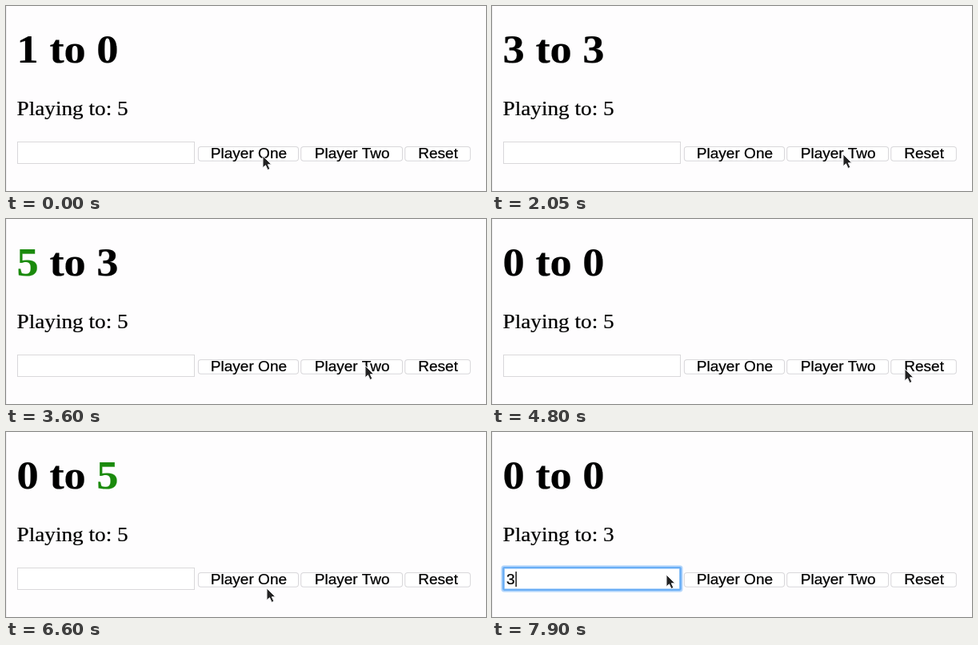
These frames come from a looping animation (600 px wide and 232 px high, 8000 ms). An HTML page:

```html
<!DOCTYPE html>
<html lang="en">
<head>
<meta charset="utf-8">
<title>Score keeper</title>
<style>
  html, body { margin: 0; width: 100%; height: 100%; overflow: hidden; background: #fefdfe; }
  svg { display: block; filter: blur(.4px); }
  text { white-space: pre; stroke: currentColor; stroke-width: .15; }
  .serif { font-family: "Liberation Serif", Times, serif; }
  .sans { font: 11.2px "Liberation Sans", Arial, sans-serif; }
  .box { fill: #fff; stroke: #d8d7da; stroke-width: .6; }
  .button text { text-anchor: middle; }
  .button.down rect { fill: #4a97f8; stroke: #3b87ee; }
  .button.down text { fill: #fff; stroke: #fff; }
  .win { fill: #1a8a0c; stroke: #1a8a0c; }
</style>
</head>
<body>
<svg width="600" height="232" viewBox="0 0 600 232">
  <rect width="1" height="232" fill="#f0eff2"/>
  <!-- the page is a zoomed screen recording, slightly flattened -->
  <g transform="scale(1.7 1.58)">
    <text class="serif" x="8" y="44.9" font-size="32" font-weight="bold"><tspan id="p1"></tspan> to <tspan id="p2"></tspan></text>
    <text class="serif" x="8" y="87" font-size="16">Playing to: <tspan id="goal"></tspan></text>
    <rect class="box" x="8.5" y="107.9" width="130" height="17.1"/>
    <g id="focus">
      <rect x="8" y="107.2" width="131" height="18.5" rx="1" fill="none" stroke="#b4d6fb" stroke-width="2.6"/>
      <rect x="8.4" y="107.7" width="130.2" height="17.5" rx=".6" fill="none" stroke="#6aaef5" stroke-width="1.4"/>
      <text id="typed" class="sans" x="10.6" y="120.6"></text>
      <rect id="caret" y="110.8" width=".8" height="12"/>
    </g>
    <g id="buttons"></g>
  </g>
  <path id="cursor" d="M0 0V14.8L3.5 11.8L6.1 17.5L8.9 16.3L6.3 10.8H10.8Z" fill="#222" stroke="#f0f0f2"/>
</svg>
<script>
const $ = id => document.getElementById(id);
const LOOP = 8000, STEP = 50, GOAL = 5;
const ONE = 0, TWO = 1, RESET = 2;

let left = 141.4;
for (const [label, w] of [["Player One", 73.6], ["Player Two", 74.6], ["Reset", 48]]) {
  $("buttons").innerHTML += `<g class="button">
    <rect class="box" x="${left}" y="111.7" width="${w}" height="11.2" rx="2"/>
    <text class="sans" x="${left + w / 2 + .3}" y="120.6">${label}</text></g>`;
  left += w + 1.9;
}

// Pointer visits: leave, arrive, x, y, button, click times
const visits = [
  [0, 0, 321, 188, ONE, 550, 850],
  [1050, 1400, 439, 186, TWO, 1500, 1650, 2050],
  [2150, 2350, 325, 185, ONE, 2350, 2600],
  [2600, 2850, 32, 1],
  [3150, 3350, 327, 188, ONE, 3400],
  [3400, 3600, 449, 184, TWO, 3600, 3850],
  [4200, 4700, 516, 188, RESET, 4750],
  [5150, 5300, 437, 188, TWO, 5300, 5450, 5550, 5650, 5800],
  [6150, 6500, 326, 196, ONE, 6550],
  [6600, 7000, 535, 181, RESET, 7000],
  [7350, 7750, 218, 179]
];
const focusAt = visits.at(-1)[1], typeAt = focusAt + 150;

function pointer(t) {
  const i = visits.findLastIndex(v => v[0] <= t);
  const [leave, arrive, x1, y1] = visits[i];
  const [, , x0, y0] = visits[Math.max(i - 1, 0)];
  const u = Math.min((t - leave) / (arrive - leave || 1), 1), e = u * u * (3 - 2 * u);
  const sag = .035 * Math.abs(x1 - x0) * Math.sin(Math.PI * u);
  let x = x0 + (x1 - x0) * e, y = y0 + (y1 - y0) * e + sag;
  if (t > 2850 && t < 3150) { // circle the winning score
    const a = (t - 2850) / 300 * 2 * Math.PI;
    x -= 26 * Math.sin(a);
    y += 36 * (1 - Math.cos(a));
  }
  return [x, y];
}

// Replay the clicks by the rules of the game
function score(t) {
  let s = [1, 0];
  for (const [, , , , button, ...clicks] of visits)
    for (const c of clicks) {
      if (c > t) return s;
      if (button === RESET) s = [0, 0];
      else if (!s.includes(GOAL)) s[button]++;
    }
  return s;
}

// The last click of a visit is held long enough to show
const isDown = (button, t) => visits.some(v =>
  v[4] === button && t < v.at(-1) && t >= v.at(-1) - STEP);

function draw(t) {
  score(t).forEach((n, i) => {
    const el = $("p" + (i + 1));
    el.textContent = n;
    el.classList.toggle("win", n === GOAL);
  });
  const typed = t >= typeAt;
  $("goal").textContent = typed ? 3 : GOAL;
  $("typed").textContent = typed ? 3 : "";
  $("caret").setAttribute("x", typed ? 17.3 : 10.9);
  $("focus").style.display = t >= focusAt ? "" : "none";
  [...$("buttons").children].forEach((b, i) => b.classList.toggle("down", isDown(i, t)));
  $("cursor").setAttribute("transform", `translate(${pointer(t)})`);
}

let start;
function tick(now) {
  start ??= now;
  draw(Math.floor((now - start) % LOOP / STEP) * STEP);
  requestAnimationFrame(tick);
}
draw(0);
requestAnimationFrame(tick);
</script>
</body>
</html>
```
